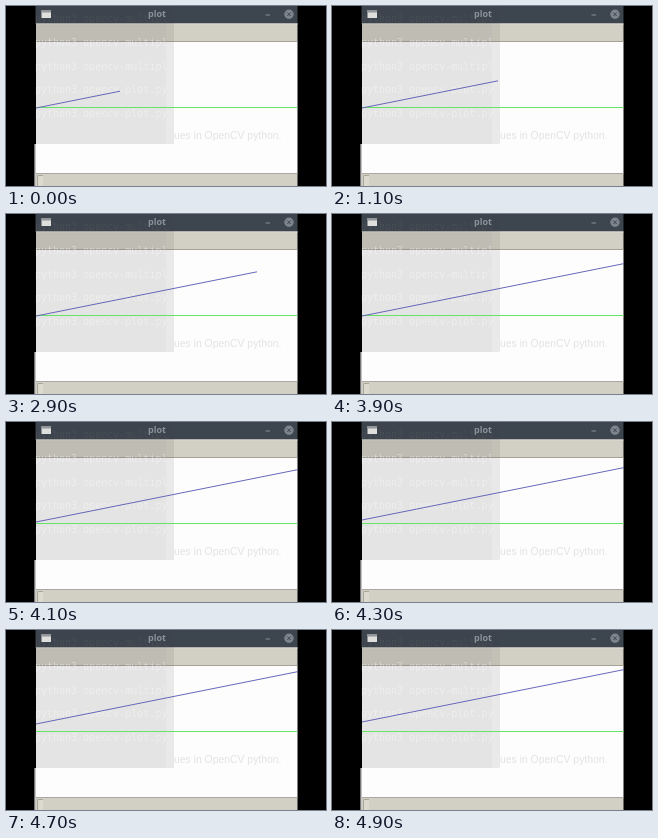
These frames come from a looping animation (320 px wide and 180 px high, 5000 ms). An HTML page:

```html
<!DOCTYPE html>
<html lang="en">
<head>
<meta charset="utf-8">
<title>plot</title>
<style>
  html, body { margin: 0; width: 100%; height: 100%; overflow: hidden; background: #000; }
  .stage { position: relative; width: 320px; height: 180px; overflow: hidden; background: #000; }
  svg { position: absolute; left: 0; top: 0; display: block; }
  .mono { font: 10px "DejaVu Sans Mono", monospace; white-space: pre; }
  .note { font: 10.4px "Liberation Sans", Arial, sans-serif; }
  .title { font: bold 9px "Open Sans", sans-serif; }

  /* The curve is revealed to the right, then scrolls once it fills the window. */
  .reveal {
    position: absolute; left: 30px; top: 36px; height: 131px;
    width: 84px; max-width: 261.5px; overflow: hidden;
    animation: grow 5s steps(50, end) -20ms infinite;
  }
  .curve { animation: scroll 5s -20ms infinite; }
  @keyframes grow { from { width: 84px; } to { width: 320px; } }
  @keyframes scroll {
    0% { transform: translateY(0); }
    78% { transform: translateY(0); animation-timing-function: steps(11, end); }
    100% { transform: translateY(-11px); }
  }
</style>
</head>
<body>
<div class="stage">
  <svg width="320" height="180" viewBox="0 0 320 180">
    <!-- window -->
    <rect x="29.5" width="262" height="18" fill="#3d454f"/>
    <rect x="30" y="17.5" width="261.5" height="18.5" fill="#d2cfc4"/>
    <rect x="30" y="17.5" width="261.5" height="1" fill="#dedcd3"/>
    <rect x="30" y="35" width="261.5" height="1" fill="#a5a298"/>
    <rect x="30" y="36" width="261.5" height="131" fill="#fdfdfd"/>
    <rect x="30" y="167" width="261.5" height="13" fill="#d2d0c4"/>
    <rect x="30" y="167" width="261.5" height="1" fill="#aba99f"/>
    <rect x="28" y="138" width="1" height="42" fill="#777"/>
    <rect x="29" y="138" width="1" height="42" fill="#c4c4c2"/>
    <rect x="31" y="169" width="6" height="11" fill="#dcdacf"/>
    <path d="M31.5 180V169.5H37" fill="none" stroke="#aaa89d"/>

    <!-- ghost of the windows behind -->
    <text class="note" x="168" y="133" fill="#e3e3e3">ues in OpenCV python.</text>
    <g fill="#404040">
      <rect x="30" width="130" height="138" fill-opacity=".13"/>
      <rect x="160" width="8" height="138" fill-opacity=".1"/>
    </g>
    <g class="mono" fill="#fff">
      <text x="29" y="16" fill-opacity=".05">python3 opencv-multipl</text>
      <g fill-opacity=".38">
        <text x="29" y="40">python3 opencv-multipl</text>
        <text x="29" y="64">python3 opencv-multipl</text>
        <text x="29" y="87">python3 opencv-plot.py</text>
        <text x="29" y="111">python3 opencv-plot.py</text>
      </g>
    </g>

    <!-- title bar -->
    <rect x="35.5" y="4" width="9.5" height="8" fill="#dededc"/>
    <rect x="35.5" y="4" width="9.5" height="2.5" fill="#92969b"/>
    <text class="title" x="151" y="11" text-anchor="middle" fill="#8d939b">plot</text>
    <path d="M259.5 9H264" stroke="#878d96"/>
    <circle cx="283" cy="8.3" r="4.7" fill="#7e848d"/>
    <path d="M281.3 6.6l3.4 3.4m0-3.4l-3.4 3.4" stroke="#3d454f"/>

    <path d="M30 101.5H291.5" stroke="#66e466"/>
  </svg>
  <div class="reveal">
    <svg width="262" height="131" viewBox="30 36 262 131">
      <path class="curve" d="M30 102L292 49.6" fill="none" stroke="#6060b8" stroke-width=".95"/>
    </svg>
  </div>
</div>
</body>
</html>
```
